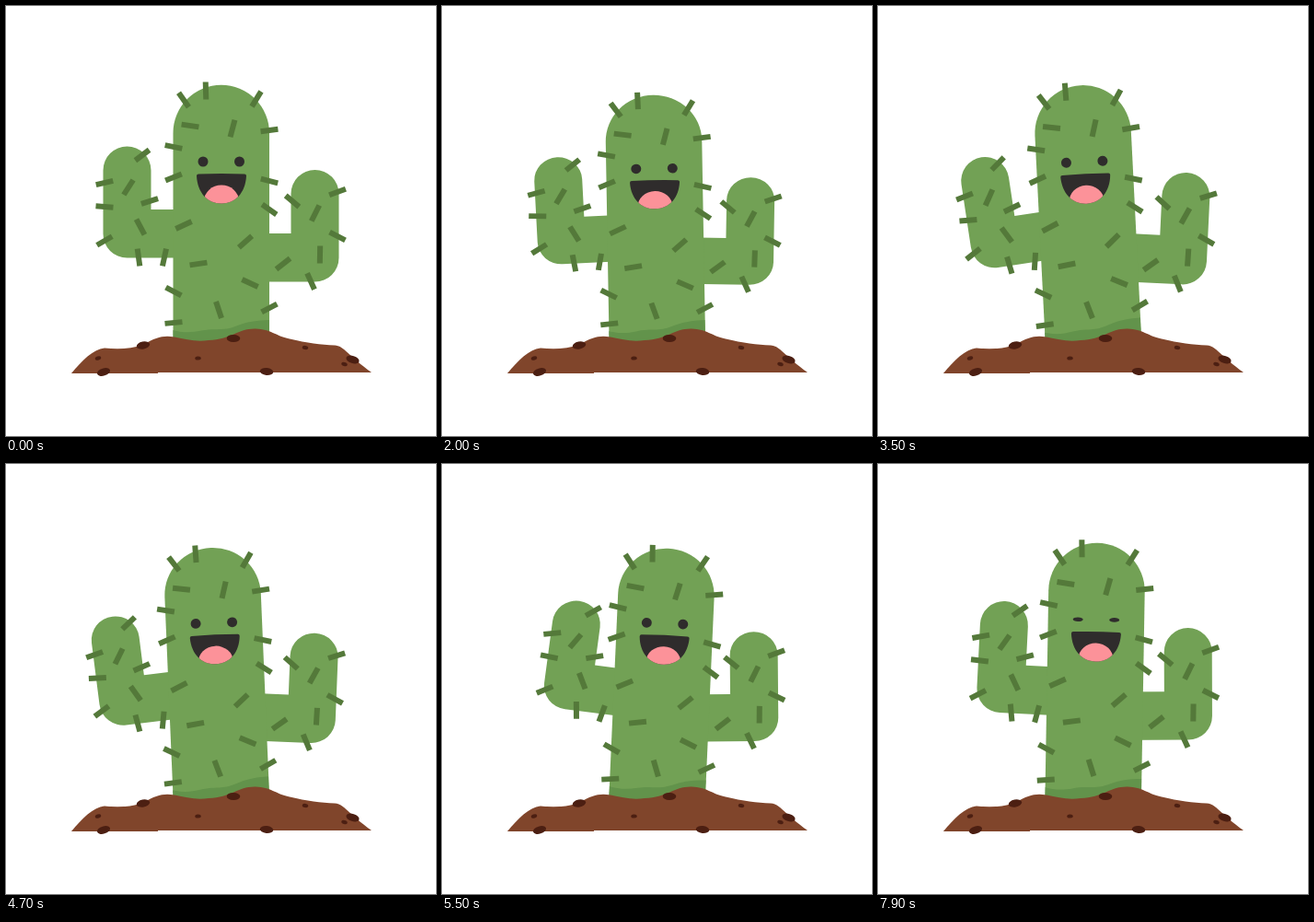
An HTML page that plays this animation: 467 px wide and 467 px high, repeating every 8000 ms.

```html
<!DOCTYPE html>
<html lang="en">
<head>
<meta charset="utf-8">
<title>Swaying cactus</title>
<style>
  html, body { margin: 0; width: 100%; height: 100%; overflow: hidden; background: #fff; }
  svg { display: block; width: 100vw; height: 100vh; }
  .skin { fill: #72a155; }
  .thorn { stroke: #54793a; stroke-width: 6; }
  #stones { fill: #4c1f12; }
</style>
</head>
<body>
<svg viewBox="0 0 467 467">
  <defs>
    <clipPath id="trunkClip"><path id="trunkShape" d="M181.5 369V138a52.25 52.25 0 0 1 104.5 0V369z"/></clipPath>
    <clipPath id="mouthClip"><path id="mouth" d="M207 184.5Q207 182.5 209 182.5Q234 181.5 259 182.5Q261 182.5 261 184.5C260 203 249 214.5 234 214.5S208 203 207 184.5z"/></clipPath>
  </defs>
  <g id="cactus">
    <g id="leftArm">
      <path class="skin" d="M105.5 178.5a26 26 0 0 1 52 0V221H215V273.5H131.5a26 26 0 0 1 -26 -26z"/>
    </g>
    <g id="rightArm">
      <path class="skin" d="M361.5 204a26 26 0 0 0 -52 0V247H250V299.5H335.5a26 26 0 0 0 26 -26z"/>
    </g>
    <g id="trunk">
      <use class="skin" href="#trunkShape"/>
      <path fill="#62934b" clip-path="url(#trunkClip)" d="M178 351C190 355 200 355 212 352.500S228 352 240 350.500C254 348 258 341 290 341V369H178z"/>
    </g>
    <g fill="#2f2c2c">
      <ellipse class="eye" cx="214" cy="169" rx="5.5"/>
      <ellipse class="eye" cx="253.5" cy="169" rx="5.5"/>
      <use href="#mouth"/>
      <ellipse cx="234" cy="212" rx="19" ry="17.5" fill="#fc9299" clip-path="url(#mouthClip)"/>
    </g>
  </g>
  <path fill="#80452b" d="M71 399C83 385 94 373 107 371.500C120 373 135 373 150 367.500C163 360 170 357.500 183 359.500C196 362 206 365 220 363C245 362 252 350 271 350.500C288 351 292 358 308 361.500C327 366 342 368 357 368.500C367 369 372 380 397 398H165V399z"/>
  <g id="stones"></g>
</svg>
<script>
const $ = id => document.getElementById(id);
const add = (id, markup) => $(id).insertAdjacentHTML('beforeend', markup);

// Thorns turn evenly from the first angle to the last, in the order of their points.
function thorns(part, from, to, points) {
  points.forEach(([x, y], i) => {
    const angle = from + (to - from) * i / (points.length - 1);
    add(part, `<path class="thorn" d="M-9.5 0h19" transform="translate(${x} ${y}) rotate(${angle})"/>`);
  });
}
const edge = (x, ...ys) => ys.map(y => [x, y]);

thorns('trunk', -22, 28, edge(182, 186, 344, 153, 310));
thorns('trunk', -28, 35, edge(286, 328, 135, 190, 221));
thorns('trunk', 55, 205, [[193, 102], [231, 330], [217, 92], [246, 133], [272, 101],
  [260, 256], [193, 238], [209, 280], [200, 130], [265, 301]]);
thorns('leftArm', -30, 4, edge(107, 255, 192, 218));
thorns('leftArm', 62, 163, [[146, 240], [144, 273], [172, 273], [133, 197], [148, 162], [156, 212]]);
thorns('rightArm', -20, 27, edge(360, 202, 250));
thorns('rightArm', 40, 142, [[311, 212], [331, 299], [341, 270], [336, 225], [301, 280]]);

// Stones tilt with the slope of the mound.
function stones(rx, ry, points) {
  for (const [x, y] of points) {
    add('stones', `<ellipse rx="${rx}" ry="${ry}" transform="translate(${x} ${y}) rotate(${(x - 240) / 8})"/>`);
  }
}
stones(7.3, 4, [[106, 397.5], [149, 368.5], [247, 361], [283, 397], [376.5, 384]]);
stones(3.3, 2.1, [[100, 382.5], [208.5, 382.5], [325, 371], [367.5, 389]]);

const LOOP = 8000, STEP = 100;
const LEFT = -2.87, RIGHT = 3.2;
const sways = [
  { start: 1450, duration: 1400, from: 0, to: LEFT, depth: 0.042 },
  { start: 4450, duration: 1350, from: LEFT, to: RIGHT, depth: 0.033 },
  { start: 7350, duration: 870, from: RIGHT, to: 0, depth: 0 }
];
const blinks = [100, 600, 2500, 3300, 3800, 5200, 6000, 6500, 7900];
const eyes = document.querySelectorAll('.eye');

function pose(t) {
  const sway = sways.findLast(s => t >= s.start);
  if (!sway) return { lean: 0, squash: 0 };
  const turn = Math.PI * Math.min(1, (t - sway.start) / sway.duration);
  return {
    lean: sway.from + (sway.to - sway.from) * (1 - Math.cos(turn)) / 2,
    squash: sway.depth * Math.sin(turn)
  };
}

function draw(t) {
  const { lean, squash } = pose(t);
  $('cactus').setAttribute('transform',
    `translate(234 360) scale(1 ${1 - squash}) rotate(${lean}) translate(-234 -360)`);
  $('leftArm').setAttribute('transform', `rotate(${lean * 2} 186 247)`);
  $('rightArm').setAttribute('transform', `rotate(${lean * (lean > 0 ? -1.2 : -1.95)} 255 273)`);

  const blinking = blinks.some(b => t >= b && t < b + 200);
  eyes.forEach(eye => eye.setAttribute('ry', blinking ? 2.3 : 5.5));
}

function tick() {
  const t = performance.now() % LOOP;
  draw(Math.floor(t / STEP) * STEP);
  requestAnimationFrame(tick);
}
tick();
</script>
</body>
</html>
```
